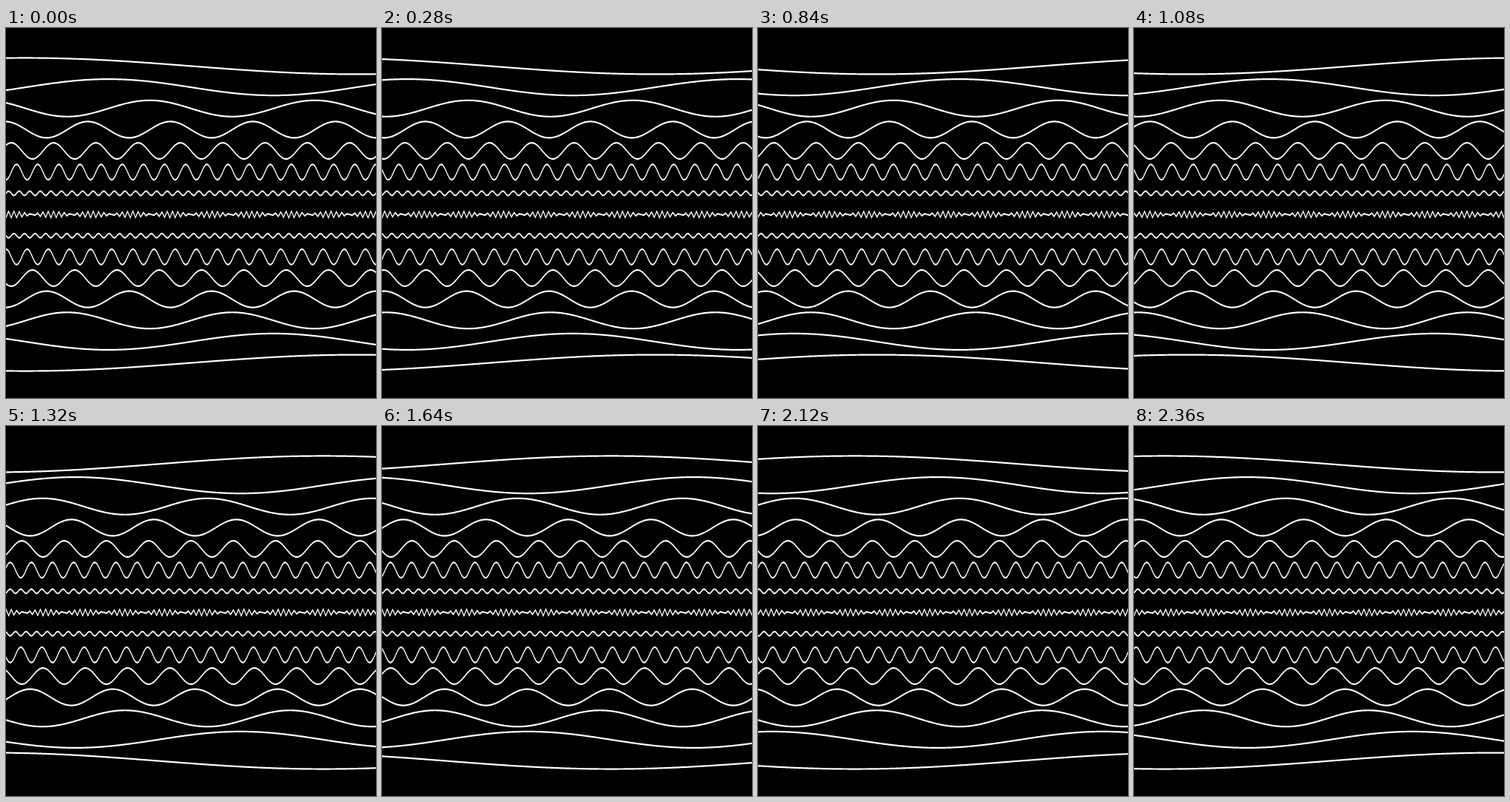
Recreate the animation shown at these times as an HTML page. Size 500 px wide and 500 px high, loop 2.4 s.

```html
<!DOCTYPE html>
<html lang="en">
<head>
<meta charset="utf-8">
<title>Waves</title>
<style>
  html, body { margin: 0; width: 100%; height: 100%; overflow: hidden; background: #000; }
  svg { display: block; width: 500px; height: 500px; }
  path { fill: none; stroke: #fff; stroke-width: 2.2; stroke-linejoin: round; }
</style>
</head>
<body>
<svg viewBox="0 0 500 500"><g id="waves"></g></svg>
<script>
const LOOP = 2400, STEP = 40, TAU = Math.PI * 2;
const MID_X = 250, MID_Y = 252, GAP = 28.65;
const SQUASH = 0.5; // the pen is narrower sideways than it is tall
const COARSE = 500 / 140;
const periods = [894, 447, 223, 111.5, 57.14, 28.57, 14.285];
const heights = [11, 11, 11, 11, 10.9, 10.4, 2.9];

const group = document.getElementById('waves');
group.setAttribute('transform', `scale(${SQUASH} 1)`);

const rows = [];
function addRow(y, cycles, period, height, dx) {
  const path = document.createElementNS('http://www.w3.org/2000/svg', 'path');
  group.append(path);
  rows.push({ path, y, cycles, period, height, dx });
}

periods.forEach((period, i) => {
  const offset = (7 - i) * GAP;
  addRow(MID_Y - offset, i + 1, period, heights[i], 1);
  addRow(MID_Y + offset, i + 1, period, -heights[i], 1);
});
// sampled just short of twice per cycle, which makes it beat
addRow(MID_Y, 8, COARSE * 15 / 7, 4.6, COARSE);

function wave({ y, cycles, period, height, dx }, t) {
  const points = [];
  const count = Math.round(500 / dx) + 2;
  for (let i = -2; i <= count; i++) {
    const x = i * dx;
    const v = Math.sin(TAU * ((x - MID_X) / period + cycles * t));
    points.push((x / SQUASH).toFixed(2) + ' ' + (y + height * v).toFixed(2));
  }
  return 'M' + points.join('L');
}

function draw(ms) {
  const t = Math.floor((ms % LOOP) / STEP) * STEP / LOOP;
  for (const row of rows) row.path.setAttribute('d', wave(row, t));
}

let start;
function tick(now) {
  start ??= now;
  draw(Math.max(0, now - start));
  requestAnimationFrame(tick);
}
draw(0);
requestAnimationFrame(tick);
</script>
</body>
</html>
```
